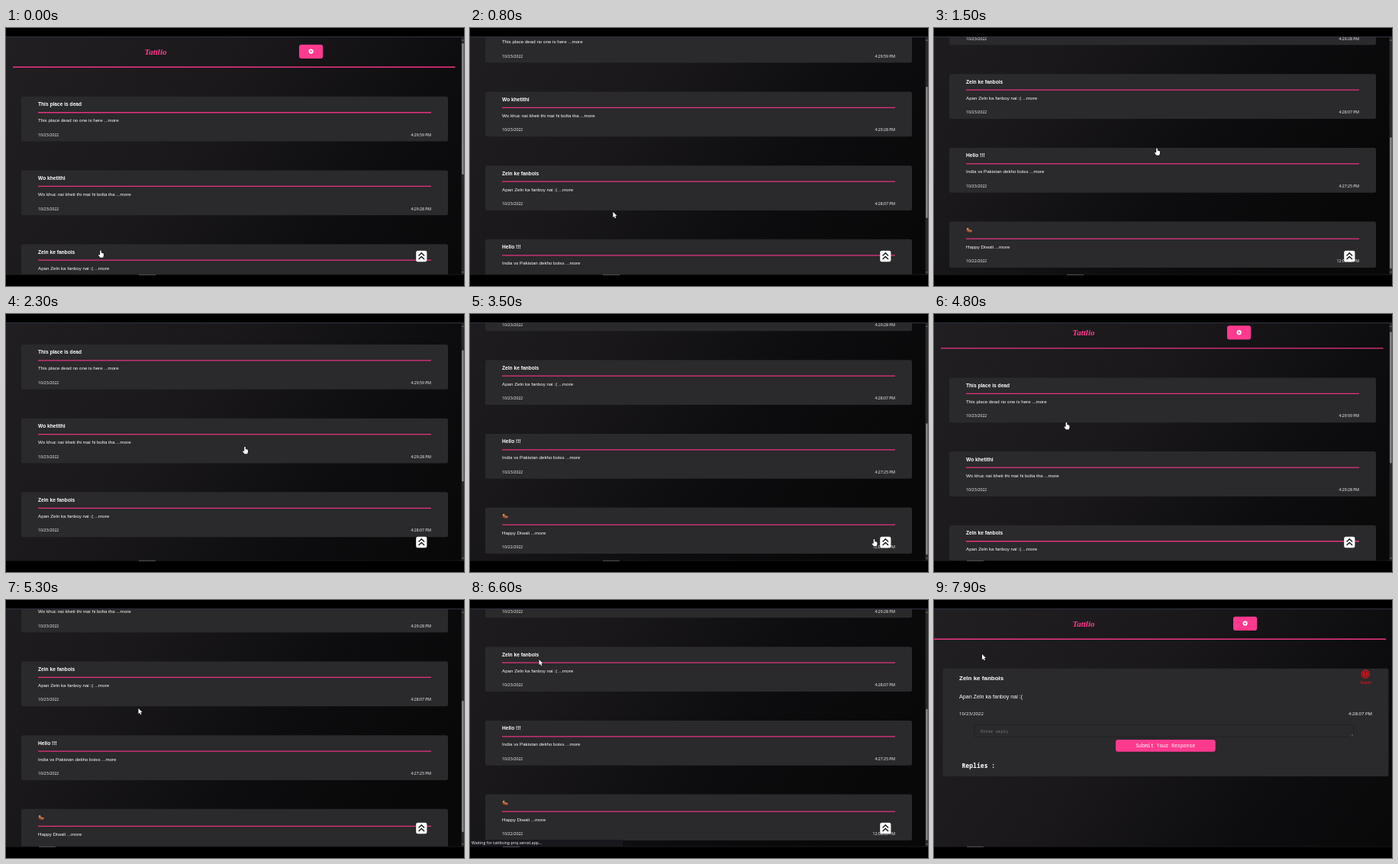
These frames come from a looping animation (600 px wide and 338 px high, 8 s). An HTML page with a canvas:

```html
<!DOCTYPE html>
<html lang="en">
<head>
<meta charset="utf-8">
<title>Message board</title>
<style>
html, body { margin: 0; width: 100%; height: 100%; overflow: hidden; background: #000; }
canvas { display: block; width: 600px; height: 338px; }
</style>
</head>
<body>
<canvas id="stage" width="600" height="338"></canvas>
<script>
const ctx = document.getElementById('stage').getContext('2d');
const LOOP = 8000;
const PINK = '#ff3a8e';
const CARD = '#2a292b';
const SANS = '"Liberation Sans", Arial, sans-serif';
const UI = '"Open Sans", "Noto Sans", sans-serif';
const MONO = '"Noto Sans Mono", "DejaVu Sans Mono", monospace';
const VIEW = { top: 12, bottom: 323 };
const STATUS_AT = 6400;
const POST_AT = 6900;

const posts = [
  ['This place is dead', 'This place dead no one is here', '10/23/2022', '4:29:59 PM'],
  ['Wo khetithi', 'Wo khuc nai kheti thi mai hi bolta tha', '10/23/2022', '4:29:28 PM'],
  ['Zeln ke fanbois', 'Apan Zeln ka fanboy nai :(', '10/23/2022', '4:28:07 PM'],
  ['Hello !!!', 'India vs Pakistan dekho boiss', '10/23/2022', '4:27:25 PM'],
  ['', 'Happy Diwali', '10/22/2022', '12:08:53 PM']
];

// [time, value...]
const scrollKeys = [
  [0, 0], [200, 0], [900, 120], [1350, 223], [1650, 223], [2300, 50], [2600, 0],
  [2800, 0], [3300, 223], [3750, 223], [4350, 0], [4700, 0], [4800, 6], [5350, 222]
];
const pointerKeys = [
  [0, 124, 291.5], [300, 124, 291.5], [1500, 292, 157.5], [2300, 313, 174],
  [2700, 313, 174], [3500, 529.5, 295], [3700, 541, 298], [3950, 541, 298],
  [4800, 173.5, 142], [5300, 173.5, 142], [6300, 90.5, 78], [6900, 90.5, 78], [7900, 63, 71]
];

function sample(keys, t, ease) {
  let i = 0;
  while (i < keys.length - 1 && keys[i + 1][0] <= t) i++;
  const a = keys[i], b = keys[i + 1];
  if (!b) return a.slice(1);
  let k = (t - a[0]) / (b[0] - a[0]);
  if (ease) k = k * k * (3 - 2 * k);
  return a.slice(1).map((v, j) => v + (b[j + 1] - v) * k);
}

function rect(x, y, w, h, color, r = 0) {
  ctx.fillStyle = color;
  ctx.beginPath();
  ctx.roundRect(x, y, w, h, r);
  ctx.fill();
}

function text(str, x, y, font, color = '#fff', align = 'left') {
  ctx.font = font;
  ctx.fillStyle = color;
  ctx.textAlign = align;
  ctx.textBaseline = 'alphabetic';
  ctx.fillText(str, x, y);
}

function path(points, color, width) {
  ctx.strokeStyle = color;
  ctx.lineWidth = width;
  ctx.beginPath();
  points.forEach(([x, y]) => ctx.lineTo(x, y));
  ctx.stroke();
}

function disc(x, y, r, color) {
  ctx.fillStyle = color;
  ctx.beginPath();
  ctx.arc(x, y, r, 0, Math.PI * 2);
  ctx.fill();
}

function backdrop(scroll) {
  const g = ctx.createLinearGradient(0, 12 - scroll, 560, 420 - scroll);
  g.addColorStop(0, '#211f22');
  g.addColorStop(0.4, '#1a181b');
  g.addColorStop(0.72, '#0d0c0e');
  g.addColorStop(1, '#090809');
  ctx.fillStyle = g;
  ctx.fillRect(0, VIEW.top, 600, VIEW.bottom - VIEW.top);
}

function header(y, buttonX, lineX, lineW) {
  text('Tattlio', 181.5, y + 34.5, 'italic bold 11px "Liberation Serif", serif', PINK);
  rect(buttonX, y + 21.7, 31.2, 18.2, PINK, 3);
  const cx = buttonX + 15.6, cy = y + 30.6;
  disc(cx, cy, 3.1, '#fff');
  path([[cx - 1.5, cy], [cx + 1.5, cy]], PINK, 0.9);
  path([[cx, cy - 1.5], [cx, cy + 1.5]], PINK, 0.9);
  rect(lineX, y + 50.6, lineW, 1.3, '#ee3583');
}

function lamp(x, y) {
  ctx.save();
  ctx.translate(x, y);
  ctx.rotate(0.35);
  ctx.fillStyle = '#a4522f';
  ctx.beginPath();
  ctx.ellipse(0, 0, 3.8, 2.5, 0, 0, Math.PI);
  ctx.fill();
  rect(-3.7, -1, 7.4, 1.1, '#d9895b', 0.5);
  disc(-2.6, -1.5, 1, '#f6b13d');
  ctx.restore();
}

const cardTop = i => 89.8 + i * 96.7;
const cardHeight = i => i === 4 ? 60.4 : 58.8;

function card(i, scroll) {
  const [title, body, date, time] = posts[i];
  const y = cardTop(i) - scroll;
  const shift = i === 4 ? 1.6 : 0;
  rect(20, y, 559, cardHeight(i), CARD, 2.5);
  if (title) text(title, 42, y + 12.5, 'bold 6.63px ' + SANS);
  else lamp(46.2, y + 11.4);
  rect(42, y + 20.3 + shift, 515, 1.3, '#e33480');
  text(body + ' ...more', 42, y + 33.5 + shift, '6.2px ' + SANS);
  text(date, 42, y + 52 + shift, '5.15px ' + UI);
  text(time, 557, y + 52 + shift, '5.15px ' + UI, '#fff', 'right');
}

function topButton() {
  rect(537.2, 291.8, 14.2, 14.4, '#fff', 2.2);
  ctx.lineCap = 'round';
  [298, 302.6].forEach(y => path([[541, y], [544.3, y - 3.2], [547.6, y]], '#151515', 1.4));
  ctx.lineCap = 'butt';
}

function scrollbar(scroll) {
  rect(596.6, VIEW.top, 3.4, 311, '#29282a');
  rect(597.2, 20 + scroll * 0.553, 2.4, 172, '#8d8d8f', 1);
  path([[597.3, 17], [598.4, 15.5], [599.5, 17]], '#8d8d8f', 0.7);
  path([[597.3, 319], [598.4, 320.5], [599.5, 319]], '#8d8d8f', 0.7);
}

function board(scroll) {
  backdrop(scroll);
  header(-scroll, 384, 9, 579.5);
  posts.forEach((_, i) => card(i, scroll));
  topButton();
  scrollbar(scroll);
}

function postPage() {
  const [title, body, date, time] = posts[2];
  backdrop(0);
  header(0, 392, 0, 592);
  rect(11.5, 89.8, 584, 141.2, CARD, 2);
  text(title, 33, 105, 'bold 8px ' + SANS);
  disc(565.3, 97, 5.7, '#c9141c');
  ctx.strokeStyle = CARD;
  ctx.lineWidth = 0.7;
  ctx.beginPath();
  ctx.arc(565.3, 97, 3.9, 0, Math.PI * 2);
  ctx.stroke();
  rect(564.8, 94.3, 1.1, 3.3, CARD);
  rect(564.8, 98.4, 1.1, 1.1, CARD);
  text('Report', 566, 110, 'bold 4.6px ' + SANS, '#c9141c', 'center');
  text(body, 33, 129, '7.13px ' + SANS);
  text(date, 33, 150.6, '6px ' + UI);
  text(time, 574, 150.6, '6px ' + UI, '#fff', 'right');
  ctx.strokeStyle = '#222123';
  ctx.lineWidth = 1;
  ctx.strokeRect(53, 163.5, 496.5, 16);
  text('Enter reply', 61, 173.8, '5.5px ' + MONO, '#77767a');
  path([[546.6, 178.4], [549, 176]], '#8a898c', 0.6);
  path([[548, 178.4], [549, 177.4]], '#8a898c', 0.6);
  rect(238, 183, 130.7, 15.8, PINK, 3);
  text('Submit Your Response', 303.2, 193.3, '500 6.5px ' + MONO, '#fff', 'center');
  text('Replies :', 36.5, 219.8, 'bold 8.1px ' + MONO);
}

function statusBar() {
  rect(0, 314, 200, 9, '#18171d', [0, 2, 0, 0]);
  text('Waiting for tattlioing-proj.vercel.app...', 2, 320.4, '5.25px ' + UI);
}

function arrow(x, y) {
  ctx.beginPath();
  [[0, 0], [0, 7.2], [1.6, 5.7], [2.7, 8.2], [3.9, 7.7], [2.8, 5.2], [5, 5.1]]
    .forEach(([dx, dy]) => ctx.lineTo(x + dx, y + dy));
  ctx.closePath();
  finishPointer();
}

function hand(x, y) {
  ctx.beginPath();
  [[-0.8, 0], [0.7, 0], [0.8, 2.9], [3.7, 3.8], [4.1, 6], [3.2, 9.2], [-0.6, 9.2],
   [-3, 6.2], [-2.6, 5.2], [-0.9, 6]]
    .forEach(([dx, dy]) => ctx.lineTo(x + dx, y + dy));
  ctx.closePath();
  finishPointer();
}

function finishPointer() {
  ctx.lineJoin = 'round';
  ctx.strokeStyle = '#111';
  ctx.lineWidth = 1.2;
  ctx.stroke();
  ctx.fillStyle = '#fff';
  ctx.fill();
  ctx.lineJoin = 'miter';
}

function overLink(x, y, scroll) {
  if (x > 537 && x < 552 && y > 291 && y < 307) return true;
  return x > 20 && x < 579 && posts.some((_, i) => {
    const d = y + scroll - cardTop(i);
    return d >= 0 && d <= cardHeight(i);
  });
}

function draw(t) {
  const [scroll] = sample(scrollKeys, t, false);
  const [x, y] = sample(pointerKeys, t, true);
  const loading = t >= STATUS_AT;

  ctx.fillStyle = '#000';
  ctx.fillRect(0, 0, 600, 338);
  ctx.save();
  ctx.beginPath();
  ctx.rect(0, VIEW.top, 600, VIEW.bottom - VIEW.top);
  ctx.clip();
  if (t < POST_AT) {
    board(scroll);
    if (loading) statusBar();
  } else {
    postPage();
  }
  ctx.restore();

  rect(0, 11, 600, 1.3, '#2b2c38');
  rect(0, 322.8, 600, 0.8, '#1c1c20');
  rect(t < 4550 ? 174 : 43, 322.8, 22, 1, '#55555a');

  if (!loading && overLink(x, y, scroll)) hand(x, y);
  else arrow(x, y);
}

const start = performance.now();
function tick() {
  draw((performance.now() - start) % LOOP);
  requestAnimationFrame(tick);
}
tick();
</script>
</body>
</html>
```
